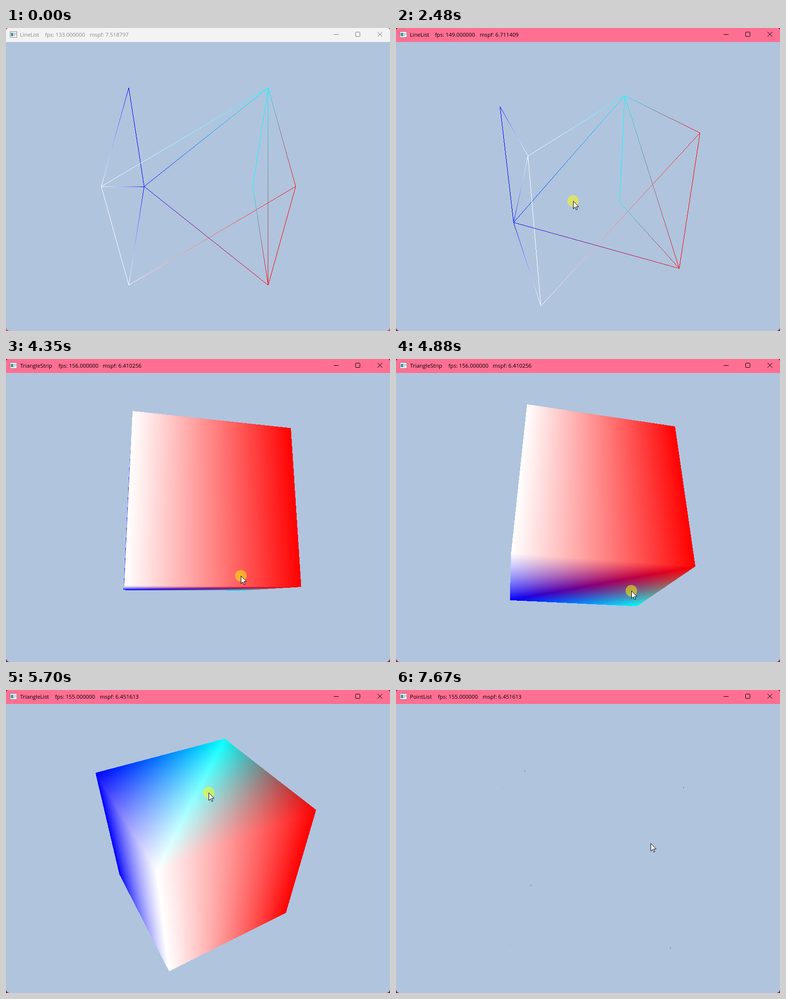
These frames come from a looping animation (798x629 px, 8000 ms). An HTML page with a canvas:

```html
<!DOCTYPE html>
<html lang="en">
<head>
<meta charset="utf-8">
<title>Cube topologies</title>
<style>
  html, body { margin: 0; width: 798px; height: 629px; overflow: hidden; }
  body { position: relative; background: #b0c4de; }
  canvas { display: block; }
  span {
    position: absolute; top: 0; white-space: pre;
    font: 11.3px/27px "Open Sans", "Noto Sans", sans-serif;
  }
</style>
</head>
<body>
<canvas id="stage" width="798" height="629"></canvas>
<span id="name"></span><span id="fps"></span><span id="mspf"></span>
<script>
const W = 798, H = 629, BAR = 29, VIEW_H = H - BAR, LOOP = 8000;
const CENTER_X = 400, CENTER_Y = 300, RADIUS = 5;
const FOCAL = CENTER_Y / Math.tan(Math.PI / 8);
const SKY = 0xffdec4b0, BLACK = 0xff000000, WHITE = 0xffffffff;
const DEG = Math.PI / 180, LAG = 35, TURN = 0.25;

const ctx = document.getElementById('stage').getContext('2d');
const image = ctx.createImageData(W, VIEW_H);
const pixels = new Uint32Array(image.data.buffer);
const labels = ['name', 'fps', 'mspf'].map(id => document.getElementById(id));

const white = [255, 255, 255], red = [255, 0, 0], blue = [0, 0, 255], cyan = [0, 255, 255];
const cube = [
  [-1, -1, -1, white], [-1, 1, -1, white], [1, 1, -1, red], [1, -1, -1, red],
  [-1, -1, 1, blue], [-1, 1, 1, blue], [1, 1, 1, cyan], [1, -1, 1, cyan]
];
const indices = [...'012023465476451410326367156162403437'].map(Number);

// start time, topology, text positions, frame rate
const modes = [
  { at: 0, name: 'LineList', x: [29, 81, 174], fps: 133, draw: drawLines },
  { at: 1810, name: 'LineList', x: [29, 81, 174], fps: 149, draw: drawLines },
  { at: 2880, name: 'TriangleStrip', x: [29.5, 109, 201], fps: 156, draw: drawFaces },
  { at: 5370, name: 'TriangleList', x: [29.5, 102, 195], fps: 155, draw: drawFaces },
  { at: 7470, name: 'PointList', x: [29, 87, 180], fps: 155, draw: drawPoints }
];

// time, x, y of the pointer
const path = [
  [130, 648, 550], [500, 667, 440], [750, 632, 424], [930, 635, 409],
  [1200, 540, 300], [1450, 403, 182], [1740, 450, 285], [1810, 450, 285],
  [2480, 368, 359], [2540, 370, 364], [2880, 370, 364], [3300, 456, 288],
  [3380, 456, 288], [3600, 486, 322], [3680, 487, 324], [4480, 488, 480],
  [4700, 490, 537], [4845, 489, 497], [4880, 489, 481], [5300, 464, 291],
  [5600, 423, 215], [5700, 421, 213], [5800, 421, 213], [6090, 356, 250],
  [6340, 304, 313], [6380, 303, 314], [6480, 301, 320], [6580, 306, 323],
  [6950, 420, 327], [7220, 529, 318]
];

// each drag: times, pointer at press, camera angles at press
const drags = [
  { from: 1810, to: 2680, x: 450, y: 285, yaw: 0, tilt: 45 },
  { from: 3380, to: 7250, x: 456, y: 288, yaw: -20, tilt: 64.75 }
];

function slope(i, k) {
  if (i <= 0 || i >= path.length - 1) return 0;
  const [a, b, c] = [path[i - 1], path[i], path[i + 1]];
  const l = (b[k] - a[k]) / (b[0] - a[0]), r = (c[k] - b[k]) / (c[0] - b[0]);
  return l * r > 0 ? 2 * l * r / (l + r) : 0;
}

// monotone cubic along the path
function pointer(t) {
  const last = path.length - 1;
  if (t >= path[last][0]) return path[last].slice(1);
  let i = 0;
  while (i < last - 1 && t >= path[i + 1][0]) i++;
  const a = path[i], b = path[i + 1], h = b[0] - a[0];
  const u = Math.max(0, (t - a[0]) / h), u2 = u * u, u3 = u2 * u;
  return [1, 2].map(k =>
    a[k] * (2 * u3 - 3 * u2 + 1) + b[k] * (3 * u2 - 2 * u3) +
    h * (slope(i, k) * (u3 - 2 * u2 + u) + slope(i + 1, k) * (u3 - u2)));
}

function camera(t) {
  const d = t >= drags[1].from ? drags[1] : drags[0];
  const [x, y] = pointer(Math.min(d.to, Math.max(d.from, t - LAG)));
  return [(d.yaw + TURN * (x - d.x)) * DEG, (d.tilt + TURN * (y - d.y)) * DEG];
}

function project(yaw, tilt) {
  const sa = Math.sin(yaw), ca = Math.cos(yaw), st = Math.sin(tilt), ct = Math.cos(tilt);
  return cube.map(([x, y, z, color]) => {
    const side = x * ca + z * sa;
    const up = y * st + ct * (z * ca - x * sa);
    const depth = RADIUS - (st * (x * sa - z * ca) + y * ct);
    return {
      x: CENTER_X + FOCAL * side / depth, y: CENTER_Y - FOCAL * up / depth,
      w: 1 / depth, color, light: x * z > 0
    };
  });
}

const pack = (r, g, b) => (0xff000000 | b << 16 | g << 8 | r) >>> 0;
const cross = (a, b, x, y) => (b.x - a.x) * (y - a.y) - (b.y - a.y) * (x - a.x);

function plot(x, y, color) {
  if (x >= 0 && x < W && y >= 0 && y < VIEW_H) pixels[y * W + x] = color;
}

function line(a, b) {
  const steep = Math.abs(b.y - a.y) > Math.abs(b.x - a.x);
  const k = steep ? 'y' : 'x', o = steep ? 'x' : 'y';
  if (a[k] > b[k]) [a, b] = [b, a];
  for (let i = Math.ceil(a[k] - 0.5); i + 0.5 <= b[k]; i++) {
    const u = (i + 0.5 - a[k]) / (b[k] - a[k]);
    const j = Math.floor(a[o] + (b[o] - a[o]) * u);
    const q = u * b.w / ((1 - u) * a.w + u * b.w);
    const color = pack(...a.color.map((c, n) => Math.round(c + (b.color[n] - c) * q)));
    if (steep) plot(j, i, color); else plot(i, j, color);
  }
}

function triangle(a, b, c) {
  const area = cross(a, b, c.x, c.y);
  if (area <= 0) return;
  const x0 = Math.max(0, Math.floor(Math.min(a.x, b.x, c.x)));
  const x1 = Math.min(W - 1, Math.ceil(Math.max(a.x, b.x, c.x)));
  const y0 = Math.max(0, Math.floor(Math.min(a.y, b.y, c.y)));
  const y1 = Math.min(VIEW_H - 1, Math.ceil(Math.max(a.y, b.y, c.y)));
  const A = a.color, B = b.color, C = c.color;
  for (let y = y0; y <= y1; y++) {
    for (let x = x0; x <= x1; x++) {
      const px = x + 0.5, py = y + 0.5;
      let u = cross(b, c, px, py), v = cross(c, a, px, py), q = cross(a, b, px, py);
      if (u < 0 || v < 0 || q < 0) continue;
      u *= a.w; v *= b.w; q *= c.w;
      const s = 1 / (u + v + q);
      pixels[y * W + x] = pack(
        (u * A[0] + v * B[0] + q * C[0]) * s + 0.5,
        (u * A[1] + v * B[1] + q * C[1]) * s + 0.5,
        (u * A[2] + v * B[2] + q * C[2]) * s + 0.5);
    }
  }
}

function drawLines(v) {
  for (let i = 0; i < indices.length; i += 2) line(v[indices[i]], v[indices[i + 1]]);
}

function drawFaces(v) {
  for (let i = 0; i < indices.length; i += 3) {
    triangle(v[indices[i]], v[indices[i + 1]], v[indices[i + 2]]);
  }
}

function drawPoints(v) {
  v.forEach(p => plot(Math.floor(p.x), Math.floor(p.y), p.light ? WHITE : BLACK));
}

function rect(color, x, y, w, h) {
  ctx.fillStyle = color;
  ctx.fillRect(x, y, w, h);
}

function drawBar(mode, active) {
  const ink = active ? '#000' : '#8a8a8a';
  rect(active ? '#ff6f92' : '#f3f3f3', 0, 0, W, BAR);

  rect('#858a90', 8, 7, 15, 13);
  rect('#f6f8fa', 9, 8, 13, 11);
  rect('#4c8f98', 10, 10, 5, 7);
  rect('#c3cad2', 16, 10, 3, 7);
  rect('#6e8fb0', 20, 10, 1, 4);

  ctx.strokeStyle = active ? '#000' : '#777';
  ctx.lineWidth = 1;
  ctx.beginPath();
  ctx.moveTo(681, 13.5); ctx.lineTo(691, 13.5);
  ctx.roundRect(726.5, 8.5, 9, 9, 1);
  ctx.moveTo(772, 8); ctx.lineTo(782, 18);
  ctx.moveTo(782, 8); ctx.lineTo(772, 18);
  ctx.stroke();

  const texts = [mode.name, 'fps: ' + mode.fps.toFixed(6), 'mspf: ' + (1000 / mode.fps).toFixed(6)];
  labels.forEach((el, i) => {
    if (el.textContent !== texts[i]) el.textContent = texts[i];
    el.style.left = mode.x[i] + 'px';
    el.style.color = ink;
  });
}

function drawCorners(active) {
  ctx.fillStyle = active ? '#8a1230' : '#dc3c4c';
  ctx.beginPath();
  ctx.rect(0, 0, W, H);
  ctx.roundRect(0, 0, W, H, [5, 5, 8, 8]);
  ctx.fill('evenodd');
}

const arrow = new Path2D('M.5 .5V16.3L4.2 12.8 6.7 18.5 9 17.5 6.5 12H11.6Z');

function drawPointer(t) {
  if (t < path[0][0]) return;
  const [x, y] = pointer(t).map(Math.round);
  if (drags.some(d => t >= d.from && t < d.to)) {
    ctx.fillStyle = 'rgba(255,255,0,.5)';
    ctx.beginPath();
    ctx.arc(x, y, 12, 0, 2 * Math.PI);
    ctx.fill();
  }
  ctx.save();
  ctx.translate(x, y);
  ctx.fillStyle = '#fff';
  ctx.strokeStyle = '#000';
  ctx.lineWidth = 1;
  ctx.fill(arrow);
  ctx.stroke(arrow);
  ctx.restore();
}

function render(t) {
  const mode = modes.filter(m => t >= m.at).pop();
  const active = t >= drags[0].from;
  pixels.fill(SKY);
  mode.draw(project(...camera(t)));
  ctx.putImageData(image, 0, BAR);
  drawBar(mode, active);
  drawCorners(active);
  drawPointer(t);
}

const start = performance.now();
function tick() {
  render((performance.now() - start) % LOOP);
  requestAnimationFrame(tick);
}
tick();
</script>
</body>
</html>
```
